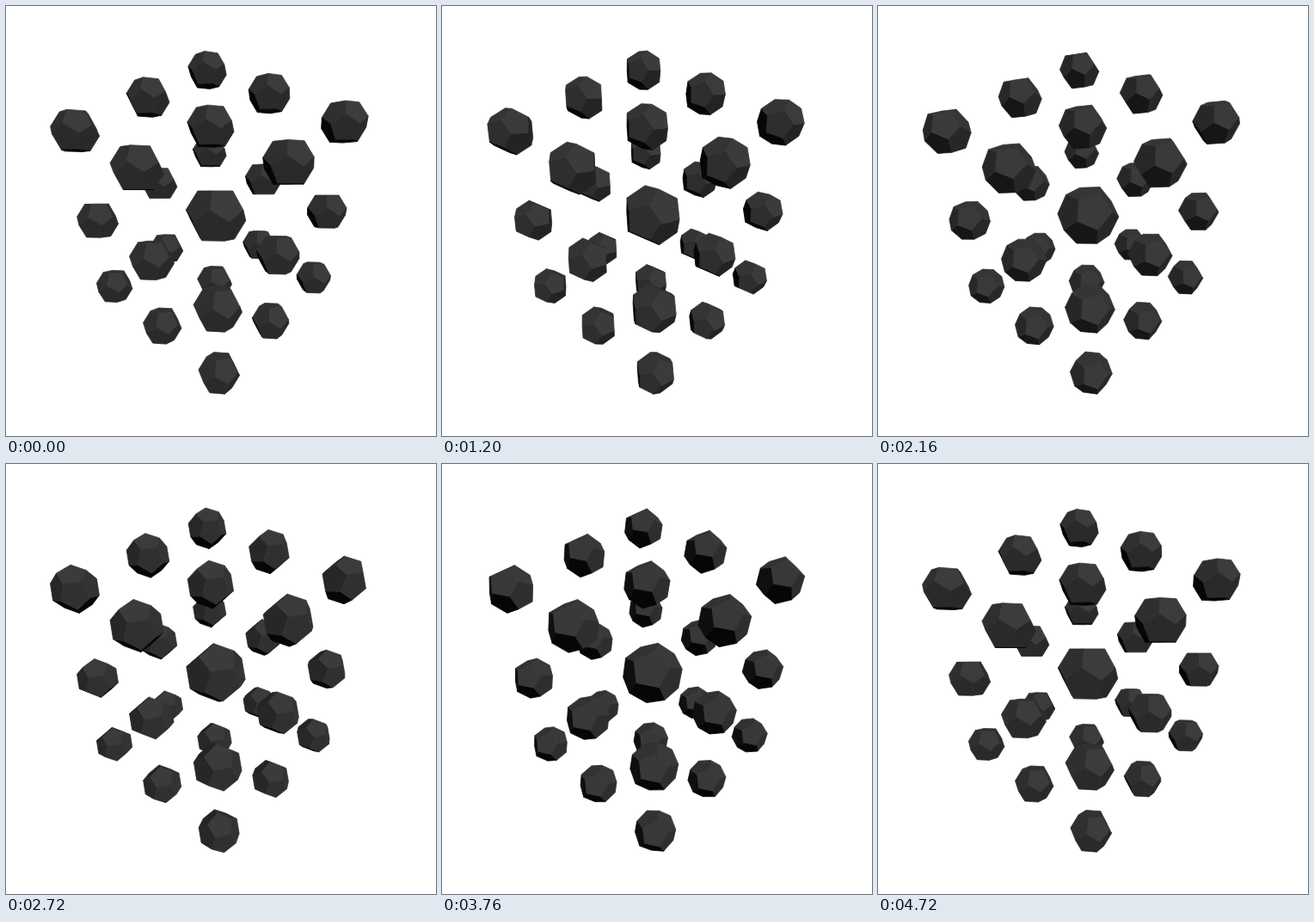
Recreate the animation shown at these times as an HTML page with a canvas. Size 500 px wide and 500 px high, loop 4800 ms.

```html
<!DOCTYPE html>
<html>
<head>
<meta charset="utf-8">
<title>Dodecahedron lattice</title>
<style>
html, body { margin: 0; width: 100%; height: 100%; overflow: hidden; background: #fff; }
canvas { display: block; width: 500px; height: 500px; }
</style>
</head>
<body>
<canvas id="stage" width="500" height="500"></canvas>
<script>
const ctx = document.getElementById('stage').getContext('2d');

const STEP = 80, STEPS = 60;
const START_ANGLE = -0.9;
const FOCAL = 525, RADIUS = 23.5;
const ORIGIN = [-9.25, -6, FOCAL];
const SPACING = [94, 117.3, 94];

// World axes in camera space: right, down, forward
const AXES = [
  [0.741, 0.443, -0.504],
  [-0.007, -0.742, -0.671],
  [-0.673, 0.499, -0.547]
];
const LIGHT = [0.32, -0.5, -0.8];

const dot = (a, b) => a[0] * b[0] + a[1] * b[1] + a[2] * b[2];
const cross = (a, b) => [a[1] * b[2] - a[2] * b[1], a[2] * b[0] - a[0] * b[2], a[0] * b[1] - a[1] * b[0]];
const add = (a, b) => a.map((v, i) => v + b[i]);
const scale = (a, k) => a.map(v => v * k);
const unit = a => scale(a, 1 / Math.hypot(...a));
const toCamera = p => [0, 1, 2].map(i => p[0] * AXES[0][i] + p[1] * AXES[1][i] + p[2] * AXES[2][i]);

// Dodecahedron: unit vertices, and the five around each face normal
const PHI = (1 + Math.sqrt(5)) / 2;
const verts = [], normals = [];
for (const a of [1, -1]) {
  for (const b of [1, -1]) {
    const r = a / PHI, t = b * PHI;
    verts.push([a, b, 1], [a, b, -1], [0, r, t], [r, t, 0], [t, 0, r]);
    normals.push([0, t, a], [a, 0, t], [t, a, 0]);
  }
}
verts.forEach((v, i) => verts[i] = unit(v));

const faces = normals.map(unit).map(n => {
  const ids = verts.map((_, i) => i).filter(i => dot(verts[i], n) > 0.7);
  const side = unit(cross(n, verts[ids[0]])), up = cross(n, side);
  const turn = i => Math.atan2(dot(verts[i], up), dot(verts[i], side));
  return ids.sort((i, j) => turn(i) - turn(j));
});

// Lattice of centres, farthest first
const centres = [];
for (let x = -1; x <= 1; x++)
  for (let y = -1; y <= 1; y++)
    for (let z = -1; z <= 1; z++)
      centres.push(add(ORIGIN, toCamera([x * SPACING[0], y * SPACING[1], z * SPACING[2]])));
centres.sort((a, b) => b[2] - a[2]);

function spin([x, y, z], angle) {
  const c = Math.cos(angle), s = Math.sin(angle);
  const x1 = x * c + z * s, z1 = z * c - x * s;
  return [x1, y * c - z1 * s, y * s + z1 * c];
}

function shade(normal) {
  const lit = Math.max(0, dot(normal, LIGHT));
  const v = Math.round(6 + 54 * Math.pow(lit, 0.4));
  return `rgb(${v},${v},${v})`;
}

function draw(angle) {
  ctx.fillStyle = '#fff';
  ctx.fillRect(0, 0, 500, 500);
  ctx.lineWidth = 0.8;
  ctx.lineJoin = 'round';

  const pts = verts.map(v => scale(toCamera(spin(v, angle)), RADIUS));
  const sides = faces.map(ids => {
    const mid = scale(ids.map(i => pts[i]).reduce(add), 1 / ids.length);
    const normal = unit(mid);
    return { ids, normal, mid, color: shade(normal) };
  });

  for (const centre of centres) {
    for (const { ids, normal, mid, color } of sides) {
      if (dot(normal, add(centre, mid)) >= 0) continue;
      ctx.beginPath();
      for (const i of ids) {
        const [x, y, z] = add(centre, pts[i]);
        ctx.lineTo(250 + FOCAL * x / z, 250 + FOCAL * y / z);
      }
      ctx.closePath();
      ctx.fillStyle = ctx.strokeStyle = color;
      ctx.fill();
      ctx.stroke();
    }
  }
}

const start = performance.now();
function tick() {
  const step = Math.floor((performance.now() - start) / STEP) % STEPS;
  // The last step repeats the first pose
  draw(START_ANGLE + 2 * Math.PI * step / (STEPS - 1));
  requestAnimationFrame(tick);
}
tick();
</script>
</body>
</html>
```
